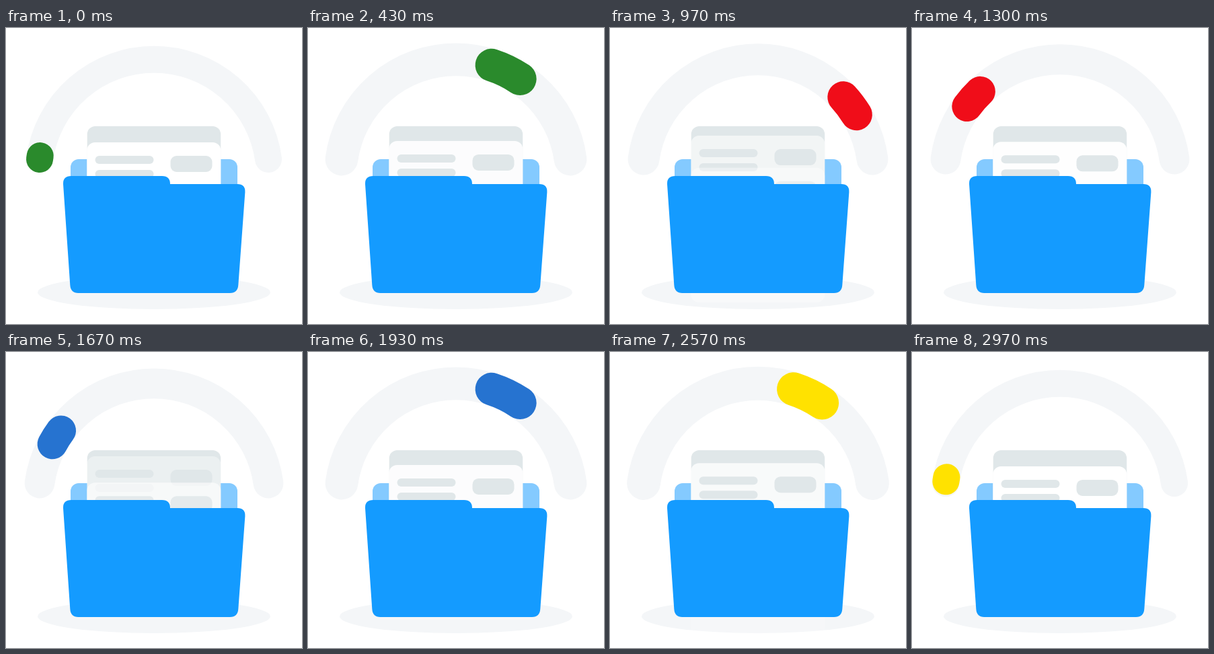
Animation of 440 by 440 pixels, one loop 3.01 s. Source, as an HTML page:

```html
<!DOCTYPE html>
<html lang="en">
<head>
<meta charset="utf-8">
<title>Folder loader</title>
<style>
  html, body { margin: 0; width: 100%; height: 100%; overflow: hidden; background: #fff; }
  svg { display: block; width: 100vw; height: 100vh; }
  .arc { fill: none; stroke-linecap: round; }
</style>
</head>
<body>
<svg viewBox="0 0 440 440">
  <defs>
    <path id="curve" d="M50 195A171.6 171.6 0 0 1 390 195"/>
    <g id="sheet" fill="#e0e7e9">
      <rect x="120.3" width="199" height="200" rx="12" fill="#fff"/>
      <rect x="132.5" y="20" width="87" height="12" rx="6"/>
      <rect x="132.5" y="41" width="87" height="12" rx="6"/>
      <rect x="244.5" y="20" width="62" height="24" rx="9"/>
    </g>
  </defs>
  <ellipse cx="220" cy="393" rx="173" ry="25" fill="#f4f6f8"/>
  <use href="#curve" class="arc" id="track" stroke="#f4f6f8"/>
  <use href="#curve" class="arc" id="bar"/>
  <rect x="96" y="195" width="248" height="190" rx="12" fill="#84caff"/>
  <rect x="120.7" y="146" width="198.5" height="200" rx="12" fill="#e0e7e9"/>
  <use href="#sheet" id="next"/>
  <use href="#sheet" id="last"/>
  <path fill="#149bff" d="M97 220H232Q244 220 244 232H344Q356 232 355.4 244L345.3 382Q344.500 394 333 394H107.500Q96 394 95.300 382L85 232Q84.500 220 97 220Z"/>
</svg>
<script>
  const [track, bar, next, last] = ['track', 'bar', 'next', 'last'].map(id => document.getElementById(id));
  const colors = ['#2a8a2c', '#f00d19', '#2673d0', '#ffe200'];
  const smooth = x => x * x * (3 - 2 * x);
  const pulse = (u, peak) => smooth(u < peak ? u / peak : (1 - u) / (1 - peak));

  // cubic-bezier(.35, 0, 0, 1)
  function settle(x) {
    let lo = 0, hi = 1, s;
    for (let i = 0; i < 20; i++) {
      s = (lo + hi) / 2;
      if (1.05 * (1 - s) ** 2 * s + s ** 3 < x) lo = s; else hi = s;
    }
    return s * s * (3 - 2 * s);
  }

  function place(sheet, y, opacity) {
    sheet.setAttribute('y', y);
    sheet.setAttribute('opacity', opacity);
  }

  function draw(now) {
    // 90 steps at 30 per second, four sweeps
    const step = Math.min(89, Math.floor((now % 3010 + 4) * 0.03));
    const sweep = Math.floor(step / 22.5);
    const u = step / 22.5 - sweep;
    const width = 40 + 10 * pulse(u, 0.46);
    const start = 487 * smooth(sweep % 2 ? 1 - u : u);
    const length = 5 + 45 * pulse(u, 0.5);

    track.setAttribute('stroke-width', width);
    bar.setAttribute('stroke-width', width);
    bar.setAttribute('stroke', colors[sweep]);
    bar.setAttribute('stroke-dasharray', `${length} 999`);
    bar.setAttribute('stroke-dashoffset', -start);

    const p = settle(u);
    place(next, 146 + 24 * p, p);
    place(last, 170 + 64 * p, 1 - p);
    requestAnimationFrame(draw);
  }
  draw(0);
</script>
</body>
</html>
```
